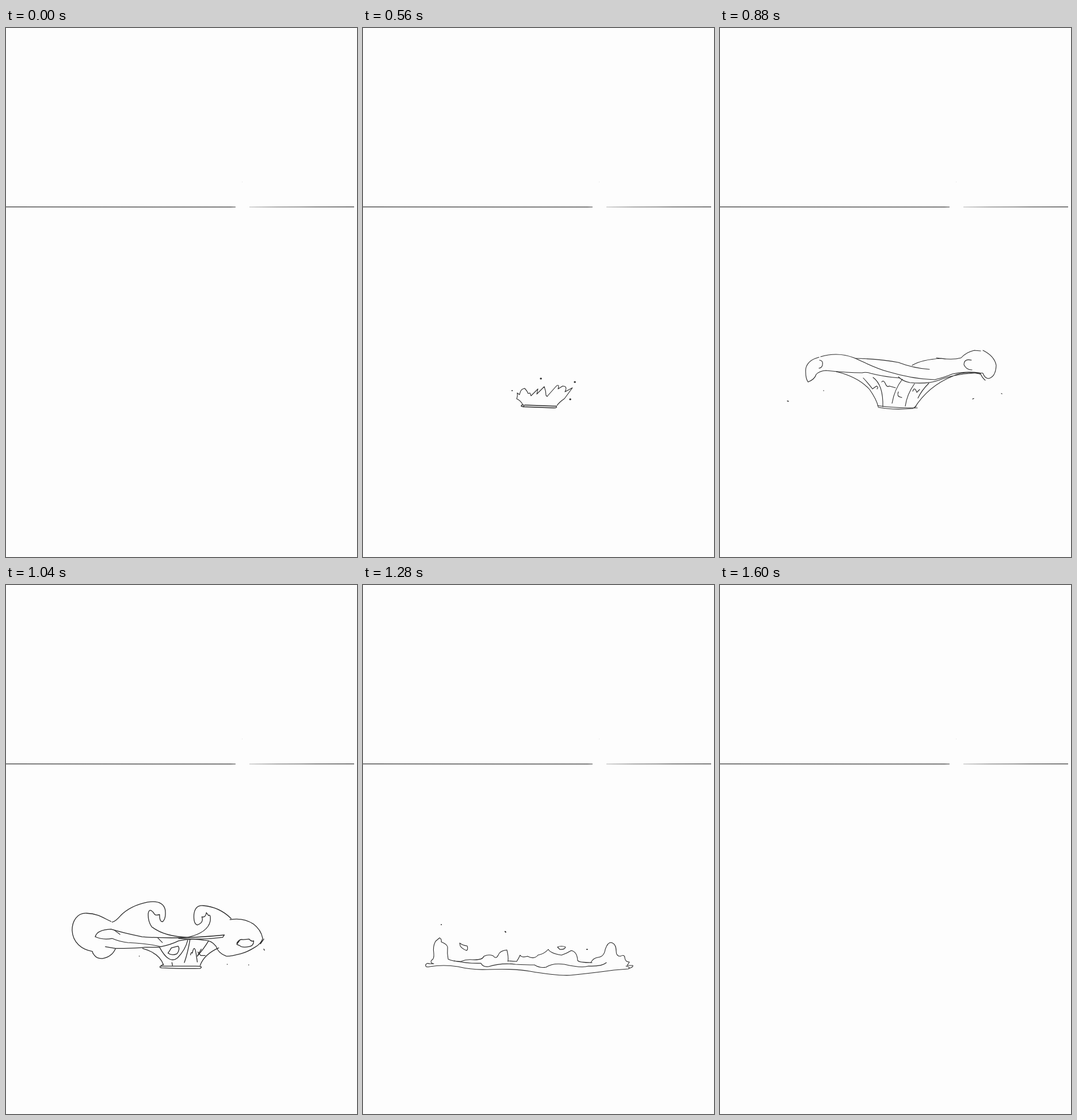
An HTML page for the animation above (1680 ms loop, 610 by 919 pixels).

```html
<!DOCTYPE html>
<html lang="en">
<head>
<meta charset="utf-8">
<title>Falling drop</title>
<style>
html, body { margin: 0; width: 100%; height: 100%; overflow: hidden; background: #fdfdfd; }
svg { display: block; width: 610px; height: 919px; }
path { fill: none; stroke: #2a2a2a; stroke-width: 1.1; stroke-linecap: round; stroke-linejoin: round; vector-effect: non-scaling-stroke; }
.bold { stroke-width: 1.3; }
.dots { stroke-width: 1.8; }
.rule { stroke: url(#ink); stroke-width: 1.4; stroke-linecap: butt; }
.pose { visibility: hidden; transform-origin: 307px 660px; animation: show 1680ms step-end infinite; animation-delay: calc(var(--i) * 80ms - 1681ms); }
.drop { transform-origin: 309px 155px; }
@keyframes show {
  0% { visibility: visible; }
  4.7619%, 100% { visibility: hidden; }
}
</style>
</head>
<body>
<svg viewBox="0 0 610 919">
  <defs>
    <linearGradient id="ink" gradientUnits="userSpaceOnUse" x1="390" y1="0" x2="540" y2="0">
      <stop offset="0" stop-color="#555"/>
      <stop offset=".07" stop-color="#888"/>
      <stop offset=".22" stop-color="#ccc"/>
      <stop offset=".55" stop-color="#888"/>
      <stop offset="1" stop-color="#555"/>
    </linearGradient>

    <g id="drop">
      <path class="bold" d="M304 143Q311 141 317 143Q322 146 321 153Q319 163 313 167Q308 169 302 168Q296 166 297 160Q298 152 302 147Q304 143 309 143"/>
    </g>

    <g id="crown">
      <path class="bold" d="M275 657c0-3 4-3 5-1l-1 2zM278 658l54 2q6 0 4-3l-55-2"/>
      <path d="M278 655Q275 648 267 644Q269 640 268 634L272 637Q274 628 278 627L281 626Q285 630 287 635L290 634L292 639L304 627L302 636L315 623Q318 631 318 638L320 640"/>
      <path d="M320 640L336 622Q342 618 339 627L347 622Q356 622 351 632L364 625L350 644Q341 650 337 656M364 625Q356 636 350 644"/>
      <path class="dots" style="stroke-width:3.2" d="M309 609h.3M368 615h.3M360 645h.3"/>
      <path class="dots" d="M259 630h.3"/>
    </g>

    <g id="bowl">
      <path d="M172 572Q152 577 149 592Q148 608 153 615Q165 610 167 602Q172 596 184 595Q222 599 247 599Q253 597 262 600Q285 606 312 608"/>
      <path d="M173 577Q180 578 178 586Q176 591 172 591"/>
      <path d="M175 571C195 565 215 566 233 573C258 584 272 592 292 597Q335 610 373 611Q390 607 404 601Q430 596 450 599"/>
      <path d="M236 574Q280 575 310 581Q336 591 364 593"/>
      <path d="M334 586Q350 576 385 574Q405 577 419 573Q428 563 442 560L453 561M376 573L391 575"/>
      <path d="M457 560Q477 570 480 586Q479 607 466 609Q460 608 457 600Q455 598 451 601"/>
      <path d="M452 601Q425 595 404 605Q362 622 338 660M310 606Q318 614 330 616Q360 619 380 612Q410 600 452 599Q455 607 461 612"/>
      <path d="M437 577Q424 574 424 585Q428 594 438 594"/>
      <path d="M202 597Q240 606 260 628Q272 645 275 658"/>
      <path d="M274 656Q300 660 343 660M275 659Q300 664 335 661L341 657"/>
      <path d="M266 607Q284 620 283 658M317 610Q303 628 299 652M338 618Q325 636 322 657M363 617Q350 630 344 643"/>
      <path d="M281 615Q284 611 287 617Q290 625 294 622L305 625M310 632Q307 640 313 641L316 642M335 631Q338 622 342 633L347 628"/>
      <path d="M249 608Q260 620 265 627L272 622Q276 624 273 627"/>
      <path class="dots" style="stroke-width:1.3" d="M117 648l2 .5M180 630h.2M439 644.5l2-.8M489 635l1 .5"/>
    </g>

    <g id="curl">
      <path class="bold" d="M180 586C166 580 158 573 137 572C120 571 111 585 111 601C112 622 128 634 147 637Q147 640 150 643Q155 650 165 649Q182 646 188 632L170 629M187 632Q220 632 240 630L266 630"/>
      <path class="bold" d="M182 587Q188 586 197 576Q214 559 245 553Q272 549 276 566Q278 580 272 586Q266 588 266 574Q258 577 256 572Q248 562 246 572Q245 585 252 595Q275 612 316 613"/>
      <path class="bold" d="M316 613Q352 605 356 585Q357 573 353 576L349 571Q348 580 341 578Q345 588 333 592Q326 590 327 574Q329 558 343 559Q372 561 393 581"/>
      <path class="bold" d="M391 583C408 580 422 584 432 590Q446 600 449 615Q446 624 435 630Q422 638 410 641Q390 646 384 645Q370 640 366 628Q358 618 345 618Q322 614 300 619Q285 626 268 629M451 616L445 624"/>
      <path class="bold" d="M152 612Q155 600 180 599Q200 605 235 612Q300 617 381 609L378 613Q340 618 300 615"/>
      <path d="M152 612Q165 618 182 615Q196 621 210 622Q250 624 268 629M186 601L196 608M263 614L271 622"/>
      <path class="bold" d="M403 623Q408 615 414 617L425 616Q429 621 433 619Q433 628 424 629Q412 631 408 627L403 625L409 617"/>
      <path class="bold" d="M236 632Q266 640 273 660M371 631Q345 642 338 661"/>
      <path class="bold" d="M273 659Q262 664 270 665Q310 667 338 666Q345 662 330 662L268 662"/>
      <path class="bold" d="M266 630Q283 660 298 648Q312 634 316 618M281 640Q284 636 287 631L299 628Q303 633 297 641Q288 645 281 640"/>
      <path class="bold" d="M320 617Q316 640 310 656M353 619Q345 632 333 645L340 633M321 643Q322 637 324 640Q328 623 331 642L333 655M334 638L339 644L347 644M288 656L289 661"/>
      <path class="dots" style="stroke-width:1.4" d="M230 645h.2M386 659h.2M424 660h.2M451 633l1 2"/>
    </g>

    <g id="puddle">
      <path d="M109 660Q110 656 116 658L123 658Q116 657 119 652Q124 650 123 640Q121 628 126 619L133 613Q137 615 136 620Q146 624 147 629Q146 640 148 650Q156 654 170 654Q180 650 190 651Q208 652 210 645Q218 641 226 644Q231 651 235 643Q238 635 250 634Q253 645 252 654"/>
      <path d="M252 653L267 654Q271 648 273 643Q276 648 286 645Q298 651 304 643Q315 641 322 633Q326 640 345 643Q354 640 362 635Q372 637 373 652Q374 656 398 656"/>
      <path d="M396 656Q400 648 408 647Q419 646 421 633Q425 621 431 621Q440 623 440 636Q440 645 447 645Q455 641 455 648Q456 655 463 655L459 661L469 661Q470 664 462 666"/>
      <path d="M109 660Q108 665 116 663Q140 659 165 663Q190 669 215 668Q265 666 290 671Q335 679 360 678Q400 674 436 669L461 667Q466 664 457 662"/>
      <path d="M158 653Q185 658 205 657Q208 664 218 663Q240 656 265 659Q285 660 298 660Q308 666 318 664Q330 656 350 659Q380 666 392 662Q415 663 423 656"/>
    </g>
    <g id="bits">
      <path d="M168 622Q173 626 181 627Q183 633 180 635Q172 632 169 627ZM338 629Q345 626 352 629Q350 634 342 633Z"/>
      <path class="dots" d="M136 590h.1M247 602l1 1M389 633h.8"/>
    </g>
  </defs>

  <path class="rule" d="M0 310.8L399 311M423 311L605 310.8"/>
  <path style="stroke:#ddd;stroke-width:1.2" d="M410.5 267.5h.1"/>

  <use class="pose drop" href="#drop" style="--i:2;transform:translateY(-128px)"/>
  <use class="pose drop" href="#drop" style="--i:3"/>
  <use class="pose drop" href="#drop" style="--i:4;transform:translateY(163px)"/>
  <use class="pose drop" href="#drop" style="--i:5;transform:translateY(340px)"/>
  <use class="pose drop" href="#drop" style="--i:6;transform:translateY(496px) scale(2,.6)"/>

  <use class="pose" href="#crown" style="--i:7"/>
  <use class="pose" href="#crown" style="--i:8;transform:scale(1.6,1.4)"/>

  <use class="pose" href="#bowl" style="--i:9;transform:scale(.76,1.08)"/>
  <use class="pose" href="#bowl" style="--i:10;transform:scale(.9,1.06)"/>
  <use class="pose" href="#bowl" style="--i:11"/>
  <use class="pose" href="#bowl" style="--i:12;transform:scale(1.03,.98)"/>

  <use class="pose" href="#curl" style="--i:13;transform:scale(.98,1.02)"/>
  <use class="pose" href="#curl" style="--i:14"/>
  <use class="pose" href="#curl" style="--i:15;transform:scale(1,.72)"/>

  <g class="pose" style="--i:16"><use href="#puddle"/><use href="#bits"/></g>
  <use class="pose" href="#puddle" style="--i:17;transform:translateY(3px) scale(1.01,.6)"/>
  <use class="pose" href="#puddle" style="--i:18;transform:translateY(6px) scale(1,.35)"/>
  <use class="pose" href="#puddle" style="--i:19;transform:translateY(8px) scale(.9,.18)"/>
</svg>
</body>
</html>
```
